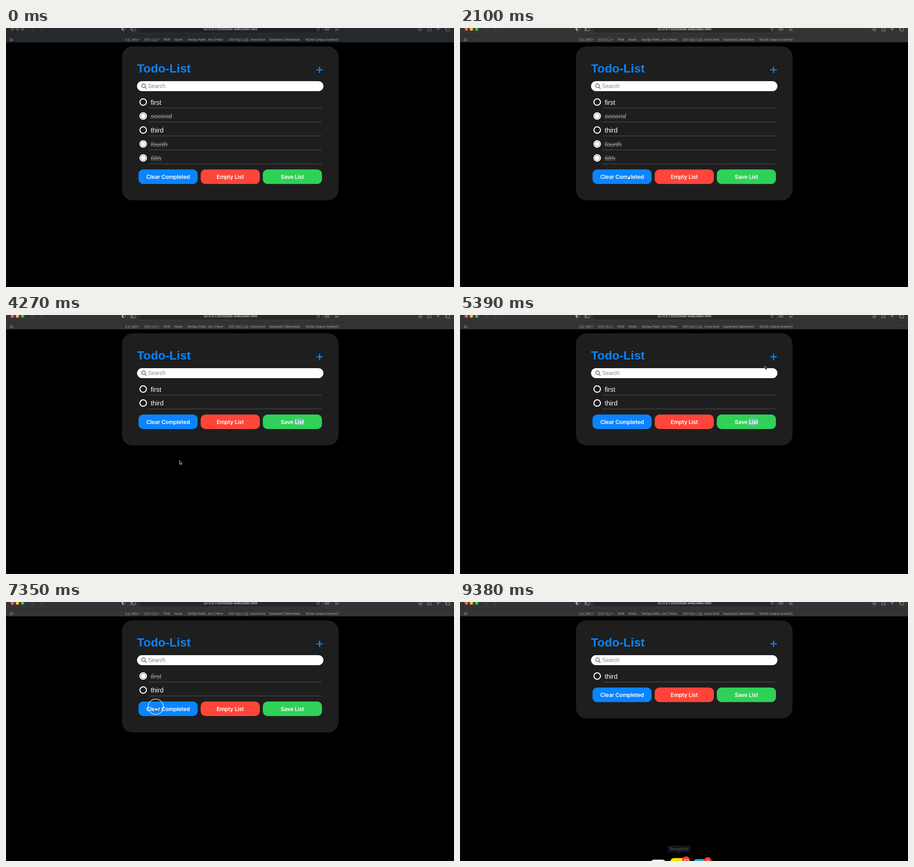
An HTML page for the animation above (9450 ms loop, 983x570 px).

```html
<!DOCTYPE html>
<html lang="en">
<head>
<meta charset="utf-8">
<title>Todo-List</title>
<style>
html, body { margin: 0; width: 100%; height: 100%; overflow: hidden; background: #000; }
svg { display: block; width: 983px; height: 570px; }
text { white-space: pre; }
.ui { font-family: Inter, "Noto Sans CJK KR", "Noto Sans CJK", sans-serif; }
.page { font-family: "Liberation Sans", Arial, sans-serif; }
.line { fill: none; stroke-linecap: round; stroke-linejoin: round; }
</style>
</head>
<body>
<svg id="stage" viewBox="0 0 983 570"></svg>
<script>
const LOOP = 9450, STEP = 70, PITCH = 30.75;
const BLUE = '#0a84ff', RED = '#ff453a', GREEN = '#30d158';
const stage = document.getElementById('stage');

function el(tag, attrs, parent = stage, text) {
  const node = document.createElementNS('http://www.w3.org/2000/svg', tag);
  set(node, attrs);
  if (text !== undefined) node.textContent = text;
  parent.appendChild(node);
  return node;
}
function set(node, attrs) {
  for (const key in attrs) node.setAttribute(key, attrs[key]);
}
const group = (parent, attrs = {}) => el('g', attrs, parent);
const rect = (x, y, width, height, rx, fill, parent) =>
  el('rect', { x, y, width, height, rx, fill }, parent);
const circle = (cx, cy, r, fill, parent) => el('circle', { cx, cy, r, fill }, parent);
const line = (d, stroke, width, parent) =>
  el('path', { d, stroke, 'stroke-width': width, class: 'line' }, parent);
const label = (str, x, y, size, fill, parent, more = {}) =>
  el('text', { x, y, 'font-size': size, fill, class: 'ui', ...more }, parent, str);
const show = (node, on) => node.setAttribute('display', on ? 'inline' : 'none');

// Browser chrome
const bar = rect(0, 0, 983, 31.5, 0, '#343437');
const divider = rect(0, 16, 983, 0.8, 0, '#29292c');
rect(0, 31.5, 0.7, 538.5, 0, '#242424');
const field = rect(292.5, -6, 399, 16, 4, '#28282b');
const lights = [14, 25, 36.5].map(x => circle(x, 2.5, 3.6, '#555'));
const lightColors = ['#ff5f57', '#febc2e', '#28c840'];
line('M60.5 -1.5L56.5 2.3L60.5 6M76 -1.5L80 2.3L76 6', '#5c5c60', 1);

const tools = group(stage);
const url = label('127.0.0.1:5500/todo-web/index.html', 492.3, 5.3, 6.95, '#e8e8e8', tools,
  { 'text-anchor': 'middle', 'font-weight': 500 });
const ICON = '#a9a9ac';
line('M254 -2V2.5Q254 5 257.5 6.5Q261 5 261 2.5V-2', ICON, 0.9, tools);
el('path', { d: 'M257.5 -2V6.5Q254 5 254 2.5V-2Z', fill: ICON }, tools);
line('M274 -2V6H284V-2M277.5 -2V6M275.2 0.5H276.2M275.2 2.5H276.2', ICON, 0.9, tools);
line('M687.2 1A3 3 0 1 0 688 3.2M685.6 1.2H687.6V-0.8', ICON, 0.9, tools);
for (let i = 0; i < 8; i++)
  rect(699.5 + i % 4 * 2.6, 0.8 + (i >> 2) * 2.8, 1.6, 1.6, 0.3, ICON, tools);
line('M722 -0.5H730.5L727.6 2.2L728.8 6L726 3.8L723.2 6L724.4 2.2Z', ICON, 0.9, tools);
line('M904.6 2A4.4 4.4 0 0 0 913.4 2M909 -2V4M907 2.2L909 4.2L911 2.2', ICON, 0.9, tools);
line('M925.3 -1V6.4H932.7V-1M929 -3V3', ICON, 0.9, tools);
line('M945 2H952M948.5 -2V5.5', ICON, 0.9, tools);
line('M966.5 0H973.3V6.5H966.5ZM964.6 4V-3', ICON, 0.9, tools);

const MARK = '#b2b2b5';
for (let i = 0; i < 9; i++)
  rect(8.7 + i % 3 * 2.5, 22.7 + Math.floor(i / 3) * 2.2, 1.6, 1.4, 0.2, '#8d8d91');
[
  [261, '프로그래밍'], [302.7, '프밍기 조교'], [345, 'TRVK'], [370, 'Novlin'],
  [398.7, 'DevOps Platfo...tion | Pelvor'], [488.3, '2021 하모니 모임...lmora Drive'],
  [577.5, 'Dashboard | Markvellum'], [657, 'VELNA Campus System(1)']
].forEach(([x, name]) => label(name, x, 27.5, 5.9, MARK, stage));
[291.3, 334.7].forEach(x => line(`M${x - 1.7} 24.6L${x} 26.3L${x + 1.7} 24.6`, MARK, 0.8));

// Card
const card = rect(254.5, 40.5, 475, 339, 23, '#1e1e1e');
el('text', { x: 287.5, y: 97.7, 'font-size': 26.3, 'font-weight': 700, fill: BLUE, class: 'page' },
  stage, 'Todo-List');
el('path', { d: 'M681 92H695M688 85V99', stroke: BLUE, 'stroke-width': 2.6 });
rect(287.5, 117, 409, 22, 11, '#fff');
el('circle', { cx: 301.7, cy: 127, r: 4, fill: 'none', stroke: '#858585', 'stroke-width': 2 });
line('M304.8 130.2L307.6 133', '#858585', 2.2);
el('text', { x: 311.7, y: 132.2, 'font-size': 12.1, fill: '#8a8a8a', class: 'page' }, stage, 'Search');

function makeRow(name) {
  const g = group(stage);
  el('circle', { cx: 301, cy: 163, r: 7.2, fill: 'none', stroke: '#fff', 'stroke-width': 2.2 }, g);
  const dot = circle(301, 163, 5.5, '#fff', g);
  const text = el('text', { x: 317.5, y: 168.6, 'font-size': 14.5, class: 'page' }, g, name);
  rect(312.5, 175.5, 380.5, 1, 0, '#565656', g);
  return { g, dot, text };
}
function drawRow(row, slot, done) {
  show(row.g, slot >= 0);
  row.g.setAttribute('transform', `translate(0 ${slot * PITCH})`);
  show(row.dot, done);
  set(row.text, {
    fill: done ? '#8c8c8c' : '#fff',
    'font-style': done ? 'italic' : 'normal',
    'text-decoration': done ? 'line-through' : 'none'
  });
}
const names = ['first', 'second', 'third', 'fourth', 'fifth'];
const rows = names.map(makeRow);

const buttons = group(stage);
let selection;
[['Clear Completed', 290.7, BLUE], ['Empty List', 427.2, RED], ['Save List', 563.5, GREEN]]
  .forEach(([name, x, color]) => {
    rect(x, 0, 129.8, 32, 10.5, color, buttons);
    if (color === GREEN) selection = rect(633, 8.7, 21, 14.8, 0, '#70bea8', buttons);
    label(name, x + 64.9, 20.5, 12, '#fff', buttons,
      { 'text-anchor': 'middle', 'font-weight': 600, 'letter-spacing': -0.12 });
  });

// Dock
const dock = group(stage);
rect(418, 567, 34, 34, 8, '#f4f4f4', dock);
rect(461.5, 563.5, 34, 34, 8, '#fae100', dock);
rect(511.5, 565.8, 33, 33, 8, '#2ba5e0', dock);
[[496, 568.2, 8.5, '40'], [543.5, 569.8, 8.3, '1']].forEach(([x, y, r, n]) => {
  circle(x, y, r, '#f03c32', dock);
  label(n, x, y + 3.9, 9.5, '#fff', dock, { 'text-anchor': 'middle' });
});
const tip = group(stage);
rect(456, 536, 50, 15, 3, '#141414', tip);
el('path', { d: 'M477 551L481 554.5L485 551Z', fill: '#141414' }, tip);
label('BomnaChat', 481, 546.2, 7, '#6a6a6a', tip, { 'text-anchor': 'middle' });

// Pointer, drawn with its hot spot at 0,0
const ring = el('circle', { r: 16.8, fill: 'none', stroke: '#fff', 'stroke-width': 1.7 });
const pointer = group(stage);
const look = { stroke: '#fff', 'stroke-width': 0.8, 'stroke-linejoin': 'round', fill: '#000' };
const arrow = el('path', { d: 'M0 0V8.2L1.9 6.5L3.2 9.4L4.6 8.8L3.4 6H5.8Z', ...look }, pointer);
const hand = el('path', {
  d: 'M-1 0.3Q0 -0.8 0.8 0.3V3.4L4 4.2Q5 4.6 4.7 6L4 9H-0.6L-2.8 6Q-3 4.8 -1 5.6Z',
  ...look, fill: '#fff', stroke: '#000'
}, pointer);

const path = [
  [1960, 369.5, 324], [4200, 369.5, 324], [4760, 628, 236], [4850, 628, 236],
  [5110, 660, 180], [5390, 669, 112.5], [5670, 688, 91], [5880, 688, 91],
  [6580, 301, 162], [6860, 301, 162], [7140, 328.5, 230.5], [7560, 328.5, 230.5],
  [7910, 580, 232], [8120, 580, 232], [8190, 585, 231], [8540, 628, 206],
  [8820, 628, 206], [9170, 481, 574]
];
function place(t) {
  const i = path.findIndex(p => p[0] > t);
  if (i < 0) return path[path.length - 1].slice(1);
  const [t0, x0, y0] = path[i - 1], [t1, x1, y1] = path[i];
  const u = (t - t0) / (t1 - t0), k = u * u * (3 - 2 * u);
  return [x0 + (x1 - x0) * k, y0 + (y1 - y0) * k];
}
function ringAlpha(t) {
  if (t >= 2730 && t < 2870) return t < 2800 ? 0.5 : 0.22;
  if (t >= 7210 && t < 7630) return t < 7280 ? 0.3 : t < 7560 ? 0.65 : 0.25;
  return 0;
}

function drawChrome(active) {
  bar.setAttribute('fill', active ? '#343437' : '#272a2d');
  divider.setAttribute('fill', active ? '#29292c' : '#1f2225');
  field.setAttribute('fill', active ? '#28282b' : '#1e2124');
  tools.setAttribute('opacity', active ? 1 : 0.75);
  url.setAttribute('fill', active ? '#e8e8e8' : '#fff');
  lights.forEach((c, i) => c.setAttribute('fill', active ? lightColors[i] : '#4c4e51'));
}

function draw(time) {
  const t = Math.floor(time % LOOP / STEP) * STEP;
  drawChrome(t >= 1960);

  const list = t < 2730 ? names : t < 7490 ? ['first', 'third'] : ['third'];
  const done = t < 2730 ? ['second', 'fourth', 'fifth'] : t >= 6650 ? ['first'] : [];
  rows.forEach((row, i) => drawRow(row, list.indexOf(names[i]), done.includes(names[i])));
  const drop = list.length * PITCH, top = 157.5 + drop;
  card.setAttribute('height', 185 + drop);
  buttons.setAttribute('transform', `translate(0 ${top})`);
  show(selection, t >= 2730 && t < 6650);

  show(pointer, t >= 1960);
  if (t >= 1960) {
    const [x, y] = place(t);
    const over = (x0, y0, w, h) => x > x0 && x < x0 + w && y > y0 && y < y0 + h;
    const clickable = t <= 4200 || over(681, 84, 15, 16) || over(292, 154, 18, 18) ||
      [290.7, 427.2, 563.5].some(b => over(b, top, 129.8, 32));
    show(hand, clickable);
    show(arrow, !clickable);
    pointer.setAttribute('transform', `translate(${x} ${y})`);
    set(ring, { cx: x, cy: y });
  }
  ring.setAttribute('opacity', ringAlpha(t));

  show(dock, t >= 9240);
  dock.setAttribute('transform', `translate(0 ${(9380 - t) / STEP * 5})`);
  show(tip, t >= 9310);
  tip.setAttribute('opacity', t < 9380 ? 0.5 : 1);
}

const start = performance.now();
function frame(now) {
  draw(Math.max(0, now - start));
  requestAnimationFrame(frame);
}
draw(0);
requestAnimationFrame(frame);
</script>
</body>
</html>
```
